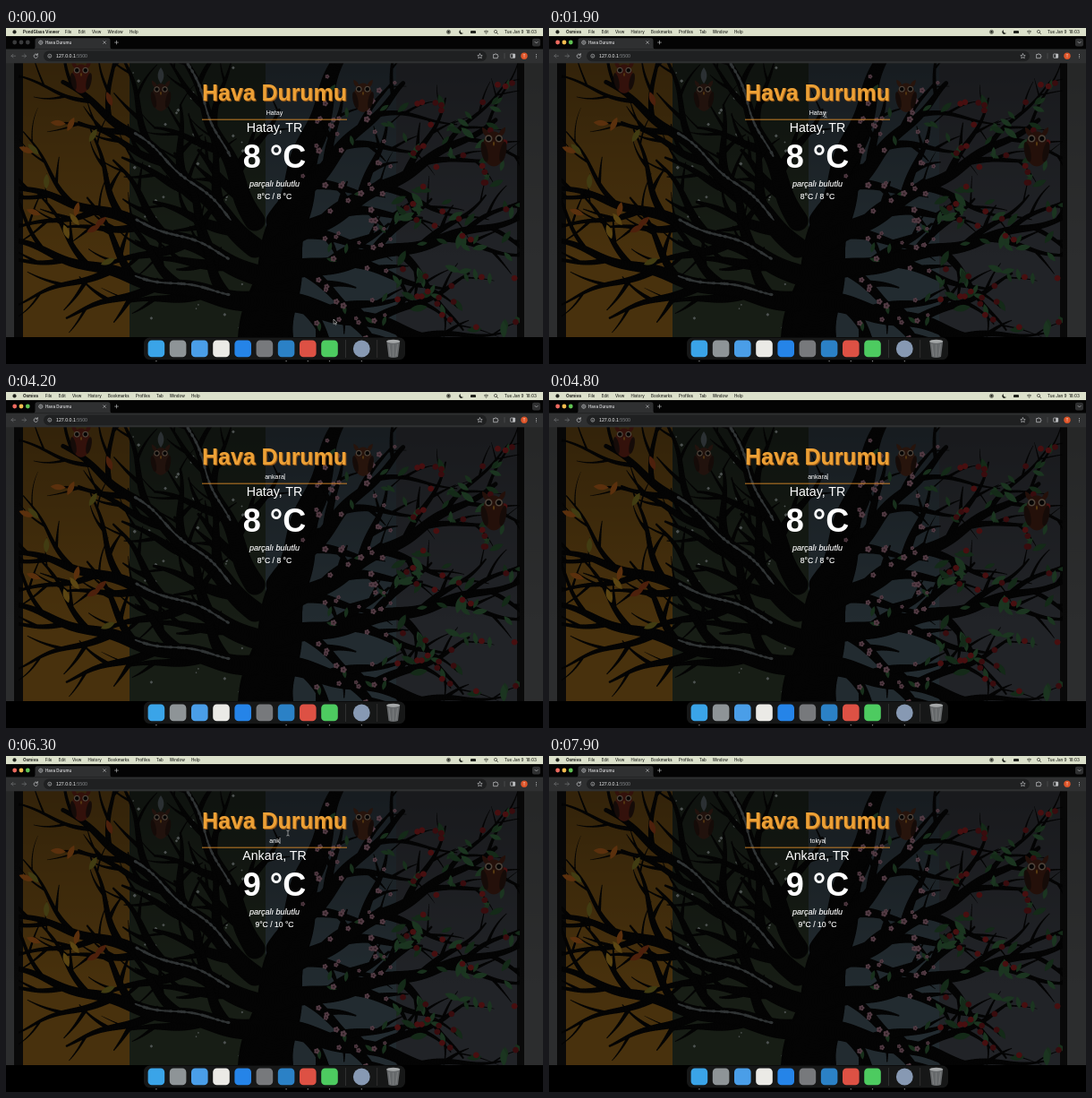
Animation of 600 by 375 pixels, one loop 8000 ms. Source, as an HTML page with a canvas:

```html
<!DOCTYPE html>
<html lang="tr">
<head>
<meta charset="utf-8">
<title>Hava Durumu</title>
<style>
  html, body { margin: 0; width: 100%; height: 100%; overflow: hidden; background: #000; }
  canvas, svg { position: absolute; left: 0; top: 0; width: 600px; height: 375px; }
  .page { font-family: "Liberation Sans", Arial, sans-serif; }
  .ui { font-family: Inter, Roboto, sans-serif; font-weight: 500; }
  .title { text-shadow: 1px 1px 1px #a8631a; }
  .small { stroke: #fff; stroke-width: .15px; }
</style>
</head>
<body>
<canvas id="art" width="1200" height="750"></canvas>
<svg id="ui" viewBox="0 0 600 375"></svg>
<script>
const LOOP = 8000;

// ---------- wallpaper ----------
const g = document.getElementById('art').getContext('2d');
let seed = 11;
const rnd = () => (seed = (seed * 16807) % 2147483647) / 2147483647;
const between = (a, b) => a + (b - a) * rnd();
const pick = list => list[Math.floor(rnd() * list.length)];
const repeat = (n, f) => { for (let i = 0; i < n; i++) f(i); };

function oval(x, y, rx, ry, color, turn = 0) {
  g.fillStyle = color;
  g.beginPath();
  g.ellipse(x, y, rx, ry, turn, 0, 7);
  g.fill();
}
function leaf(x, y, len, turn, color) {
  g.save();
  g.translate(x, y);
  g.rotate(turn);
  g.fillStyle = color;
  g.beginPath();
  g.moveTo(-len, 0);
  g.quadraticCurveTo(0, -len * 0.75, len, 0);
  g.quadraticCurveTo(0, len * 0.75, -len, 0);
  g.fill();
  g.restore();
}
function panel(x, end, top, bottom) {
  const fill = g.createLinearGradient(0, 39, 0, 345);
  fill.addColorStop(0, top);
  fill.addColorStop(0.7, bottom);
  g.fillStyle = fill;
  g.fillRect(x, 39, end - x, 306);
}
function blossom(x, y, r) {
  repeat(5, k => oval(x + Math.cos(k * 1.257) * r, y + Math.sin(k * 1.257) * r, r * 0.7, r * 0.7, '#523b44'));
  oval(x, y, r * 0.4, r * 0.4, '#2e1a20');
}
function owl(x, y, s, body) {
  g.save();
  g.translate(x, y);
  g.scale(s, s);
  oval(0, 6, 11, 17, body);
  for (const side of [-1, 1]) {
    leaf(side * 8, -10, 6, side * -1, body);
    oval(side * 5, -4, 3.6, 3.6, '#50463c');
    oval(side * 5, -4, 2.3, 2.3, '#060505');
    oval(side * 9, 9, 3, 10, '#150b08', side * 0.2);
  }
  leaf(0, 1, 2.5, 1.57, '#5a3c12');
  g.restore();
}

// Grows a tapering branch with side shoots; keeps points for foliage and snow.
const twigs = [], boughs = [];
function grow(x, y, angle, len, width, depth) {
  const step = 3, n = len / step, curl = between(-0.25, 0.25) / n;
  let side = rnd() < 0.5 ? 1 : -1;
  g.strokeStyle = '#040404';
  for (let i = 0; i < n; i++) {
    const w = width * (1 - 0.8 * i / n);
    g.lineWidth = w;
    g.beginPath();
    g.moveTo(x, y);
    angle += curl + 0.03 * Math.sin(i / 5);
    x += Math.cos(angle) * step;
    y += Math.sin(angle) * step;
    g.lineTo(x, y);
    g.stroke();
    (depth === 2 ? boughs : twigs).push({ x, y, w, angle });
    if (depth && i > 4 && i % 9 === 0) {
      side = -side;
      grow(x, y, angle + side * between(0.45, 0.8), len * between(0.28, 0.42), w * 0.7, depth - 1);
      g.strokeStyle = '#040404';
    }
  }
}

function wallpaper() {
  g.scale(2, 2);
  g.beginPath();
  g.rect(0, 39, 600, 306);
  g.clip();
  panel(0, 600, '#262727', '#2c2d2e');
  panel(9, 579, '#070707', '#090909');
  panel(19, 138, '#33230a', '#48310d');
  panel(138, 290, '#0f130f', '#171d15');
  panel(290, 436, '#171c20', '#222b30');
  panel(436, 571, '#191a1d', '#212327');

  g.save();
  g.beginPath();
  g.rect(14, 39, 560, 306);
  g.clip();
  g.lineCap = 'round';
  repeat(55, () => {
    const x = between(142, 270), y = between(44, 335), r = between(0.8, 2);
    oval(x, y, r, r * 0.6, '#4e5352');
    oval(x, y, r * 0.6, r, '#4e5352');
  });

  grow(290, 350, -1.57, 330, 62, 0);
  for (const side of [-1, 1]) {
    repeat(4, i => {
      const lift = -1 + i * 0.34;
      grow(290 + side * 12, 215 + i * 30, side > 0 ? lift : Math.PI - lift, i ? 285 : 210, 23, 2);
    });
  }

  for (const b of boughs) {
    if (b.x > 145 && b.x < 250) oval(b.x, b.y - b.w * 0.25, 2.4, between(0.8, 1.8), '#303435', b.angle);
  }
  const zone = (a, b) => twigs.filter(p => p.x > a && p.x < b && p.y > 45 && p.y < 340);
  const scatter = (n, a, b, spread, plant) => {
    const spots = zone(a, b);
    repeat(n, () => {
      const p = pick(spots);
      plant(p.x + between(-spread, spread), p.y + between(-spread, spread));
    });
  };
  scatter(14, 25, 130, 8, (x, y) => leaf(x, y, 8.5, between(0, 6), pick(['#5b300d', '#4d200c', '#413c12', '#5b4512'])));
  scatter(32, 325, 575, 7, (x, y) => leaf(x, y, 6, between(0, 6), '#18301c'));
  scatter(65, 330, 430, 7, (x, y) => blossom(x, y, between(1.3, 2.2)));
  scatter(60, 432, 570, 8, (x, y) => leaf(x, y, between(6, 10), between(0, 6), pick(['#142a18', '#1b3520'])));
  scatter(48, 440, 568, 8, (x, y) => oval(x, y, 3.4, 3.3, pick(['#480f10', '#390c0e'])));

  owl(84, 51, 0.95, '#33110b');
  owl(173, 72, 0.9, '#21120d');
  leaf(173, 53, 9, 1.57, '#2b3033');
  owl(399, 72, 0.95, '#27140c');
  owl(545, 128, 1.15, '#24100a');
  g.restore();
}
wallpaper();

// ---------- interface ----------
const text = (x, y, size, str, more = '') => `<text x="${x}" y="${y}" font-size="${size}" ${more}>${str}</text>`;
const rect = (x, y, w, h, fill, r = 0, more = '') => `<rect x="${x}" y="${y}" width="${w}" height="${h}" fill="${fill}" rx="${r}" ${more}/>`;
const dot = (x, y, r, fill, more = '') => `<circle cx="${x}" cy="${y}" r="${r}" fill="${fill}" ${more}/>`;
const ring = (x, y, r, color) => dot(x, y, r, 'none', `stroke="${color}" stroke-width=".6"`);
const line = (d, color, w = 0.7) => `<path d="${d}" fill="none" stroke="${color}" stroke-width="${w}" stroke-linecap="round" stroke-linejoin="round"/>`;
const each = (list, f) => list.map(f).join('');

function menu(id, app, x, items) {
  const row = each(items.split(' '), (s, i) => `<tspan dx="${i ? 7.3 : 0}">${s}</tspan>`);
  return `<g id="${id}" fill="#1b1d18">${text(19, 6.2, 4.6, app, 'font-weight="700"')}${text(x, 6.2, 4.4, row)}</g>`;
}
function menuBar() {
  const ink = '#20231c';
  return rect(0, 0, 600, 9.2, '#dce1cb') + dot(9.5, 4.4, 2.1, ink)
    + menu('idleMenu', 'PondGlass Viewer', 66, 'File Edit View Window Help')
    + menu('liveMenu', 'Osmiva', 44, 'File Edit View History Bookmarks Profiles Tab Window Help')
    + ring(494.5, 4.4, 2.1, ink) + dot(494.5, 4.4, 1.3, ink)
    + `<path d="M508 2A2.5 2.5 0 1 0 511 5.5A2.5 2.5 0 0 1 508 2Z" fill="${ink}"/>`
    + rect(519, 2.9, 6, 3.2, ink, 0.9)
    + line('M534.3 3.8Q536.5 1.9 538.7 3.8M535.2 5Q536.5 4 537.8 5M536.5 6.2v.1', ink)
    + ring(547, 4, 1.6, ink) + line('M548.2 5.2l1.4 1.4', ink)
    + text(557, 6.2, 4.6, 'Tue Jan 9&#160; 18:03', `fill="${ink}"`);
}
function browser() {
  const pale = '#c6c8ca', dim = '#737578', bar = '#2f3031';
  const lights = each(['#ee6a5f', '#f5bd4f', '#61c454'], (c, i) => dot(9.7 + i * 7.3, 16, 2.4, c, `class="light" data-c="${c}"`));
  return rect(0, 9.2, 600, 14.3, '#040404') + lights
    + `<path d="M30 23.5Q32.5 23.5 32.5 21V14Q32.5 11.3 35 11.3H114Q116.5 11.3 116.5 14V21Q116.5 23.5 119 23.5Z" fill="${bar}"/>`
    + ring(38.8, 16.2, 2.1, pale) + line('M36.8 16.2h4M38.8 14.2v4', pale, 0.4)
    + text(44, 17.9, 4.5, 'Hava Durumu', 'fill="#e4e5e6"')
    + line('M108.7 14.8l2.7 2.7m0-2.7l-2.7 2.7M123.5 14.2v3.8m-1.9-1.9h3.8', pale, 0.6)
    + rect(588, 11.8, 9, 8.6, bar, 2) + line('M591 15.4l1.6 1.6l1.6-1.6', pale, 0.6)
    + rect(0, 23.5, 600, 15.8, bar) + rect(42, 25.4, 495, 11.8, '#1f2021', 5.9)
    + line('M10.5 31.2H6m1.9-1.9L6 31.2l1.9 1.9M18 31.2h4.5m-1.9-1.9l1.9 1.9l-1.9 1.9', dim)
    + line('M35 29.8A2.2 2.2 0 1 0 35.5 31.8M35.3 28.5v1.7h-1.7', pale)
    + ring(48.8, 31.2, 2, pale) + line('M48.8 31v1.2', pale, 0.6)
    + text(56, 33.1, 5.25, '127.0.0.1<tspan fill="#85888b">:5500</tspan>', 'fill="#f2f3f4" font-family="Liberation Sans, Arial, sans-serif"')
    + line('M529.5 28.7l.8 1.7l1.9.2l-1.4 1.3l.4 1.9l-1.7-1l-1.7 1l.4-1.9l-1.4-1.3l1.9-.2z', pale, 0.6)
    + line('M545 29.5h1.3a.8.8 0 0 1 1.6 0h1.3v1.3a.8.8 0 0 1 0 1.6v1.3H545z', pale)
    + line('M557 28.5V34', '#606265', 0.5)
    + rect(563.7, 29, 5, 4.3, 'none', 0.4, `stroke="${pale}" stroke-width=".7"`) + rect(566.3, 29, 2.4, 4.3, pale)
    + dot(579, 31.2, 3.7, '#de5428') + line('M579 29.7v3m-.7-3h1.4', '#f6d6ca', 0.5)
    + each([-1.8, 0, 1.8], d => dot(592.5, 31.2 + d, 0.5, pale));
}
function dock() {
  const colors = ['#3aa4e8', '#8e9497', '#4a9ee8', '#ebeae6', '#2584e8', '#77797c', '#2b81c6', '#dd5144', '#4dcb60'];
  const spot = i => 167.9 + i * 24.2;
  return rect(0, 345, 600, 30, '#000') + rect(154, 345.6, 292, 24.6, '#161717', 6.5)
    + each(colors, (c, i) => rect(spot(i) - 9.3, 348.6, 18.6, 18.6, c, 4.3))
    + each([379, 414.5], x => rect(x, 348, 0.6, 20, '#414141'))
    + dot(397.3, 358, 9.4, '#8799b3')
    + '<path d="M425.3 349.3H440.2L438 367Q432.7 369 427.5 367Z" fill="#66696b"/>'
    + '<ellipse cx="432.7" cy="349.7" rx="7.5" ry="2" fill="#a5a8a9"/>'
    + line('M428 353l1.5 13M432.7 353.5v13M437.4 353l-1.5 13', '#8b8d8e', 0.6)
    + each([0, 6, 7, 8, 9.48], i => dot(spot(i), 371.8, 0.7, '#8c8c8c'));
}
function page() {
  const mid = (y, size, str, more) => text(300, y, size, str, `text-anchor="middle" ${more}`);
  return `<g class="page" fill="#fff">`
    + mid(81.3, 24.9, 'Hava Durumu', 'class="title" font-weight="700" fill="#eda136"')
    + rect(219, 101.7, 162, 0.9, '#d98a2a') + rect(290.6, 90, 19.2, 8.2, '#5f86b4', 0, 'id="mark"')
    + mid(97, 7.1, '', 'id="field"') + rect(0, 91, 0.6, 7, '#fff', 0, 'id="caret"')
    + mid(116.2, 14.2, '', 'id="city"')
    + mid(156.2, 36, '', 'id="temp" font-weight="700"')
    + mid(177.3, 9, 'parçalı bulutlu', 'font-style="italic" class="small"')
    + mid(191, 8.6, '', 'id="range" class="small"') + '</g>';
}
const pointers = '<g id="arrow"><path d="M0 0V5.4L1.3 4.3L2.2 6.2L3.1 5.8L2.3 4H4Z" fill="#0b0b0b" stroke="#eee" stroke-width=".5"/></g>'
  + `<g id="beam">${line('M-1.3-3Q0-3 0-2.2Q0-3 1.3-3M0-2.2V2.2M-1.3 3Q0 3 0 2.2Q0 3 1.3 3', '#d9d9d9', 0.6)}</g>`;

const ui = document.getElementById('ui');
ui.innerHTML = `<g class="ui">${menuBar()}${browser()}${dock()}</g>${page()}${pointers}`;
const $ = id => document.getElementById(id);
const lights = [...document.querySelectorAll('.light')];
const show = (el, on) => el.setAttribute('visibility', on ? 'visible' : 'hidden');
const put = (id, s) => { if ($(id).textContent !== s) $(id).textContent = s; };

// ---------- timeline ----------
const FOCUS = 1900, SELECT = 2600, TYPE = 3400, ENTER = 4700, ANSWER = 4900, ERASE = 6000, RETYPE = 7300;
const KEY = 140;

// Field content and the time of the latest key press.
function fieldAt(t) {
  const typed = (word, start, gap) => {
    const n = Math.min(word.length, Math.floor((t - start) / gap) + 1);
    return [word.slice(0, n), start + (n - 1) * gap];
  };
  if (t < TYPE) return ['Hatay', 0];
  if (t >= RETYPE) return typed('tokya', RETYPE, 150);
  if (t < ENTER) return typed('ankara', TYPE, KEY);
  if (t < ERASE) return ['ankara', ENTER];
  const [gone, press] = typed('ankara', ERASE, KEY);
  return ['ankara'.slice(0, 6 - gone.length), press];
}

const moves = [
  { at: 200, until: 1500, to: [309, 97] },
  { at: 2200, until: 2500, to: [308.5, 95] },
  { at: 5000, until: 5400, to: [315, 86] }
];
function pointerAt(t) {
  let p = [366, 325];
  for (const m of moves) {
    const u = Math.max(0, Math.min(1, (t - m.at) / (m.until - m.at)));
    const e = u * u * (3 - 2 * u);
    p = p.map((v, k) => v + (m.to[k] - v) * e);
  }
  return p;
}

function draw(t) {
  const live = t >= FOCUS, answered = t >= ANSWER;
  show($('idleMenu'), !live);
  show($('liveMenu'), live);
  lights.forEach(l => l.setAttribute('fill', live ? l.dataset.c : '#3a3b3c'));

  const [value, pressed] = fieldAt(t);
  put('field', value || 'Şehir Giriniz...');
  $('field').setAttribute('fill', value ? '#fff' : '#68696b');
  show($('mark'), t >= SELECT && t < TYPE);
  show($('caret'), t >= TYPE && (t - pressed) % 1000 < 500);
  $('caret').setAttribute('x', 300 + (value ? $('field').getComputedTextLength() / 2 : 0));

  put('city', answered ? 'Ankara, TR' : 'Hatay, TR');
  put('temp', answered ? '9 °C' : '8 °C');
  put('range', answered ? '9°C / 10 °C' : '8°C / 8 °C');

  const [x, y] = pointerAt(t);
  const over = y > 85 && y < 102;
  const hidden = t >= TYPE && t < moves[2].at || t >= RETYPE;
  for (const id of ['arrow', 'beam']) {
    $(id).setAttribute('transform', `translate(${x} ${y})`);
    show($(id), !hidden && over === (id === 'beam'));
  }
}

function tick() {
  draw(performance.now() % LOOP);
  requestAnimationFrame(tick);
}
tick();
</script>
</body>
</html>
```
